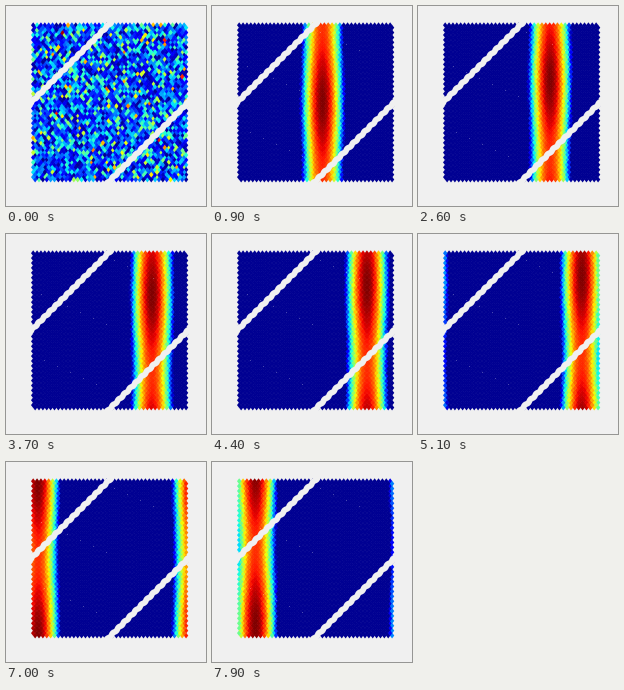
A matplotlib script that plays this animation: 200 by 200 pixels, repeating every 8000 ms.

```python
import numpy as np
import matplotlib.pyplot as plt
from matplotlib.animation import FuncAnimation
from matplotlib.collections import PolyCollection

SIZE, DPI = 200, 100
FRAMES, INTERVAL = 80, 100
PERIOD = 156.0            # both sides of the sheet wrap around
HALF_BAND = 22.4
SPEED = 12.7              # px per second, right and up
HOLD = 4                  # frames of plain noise at the start
PAPER = "#f0f0f0"

rng = np.random.default_rng(7)


def lattice(cols=40, rows=64, dx=3.87, dy=2.45):
    """Centres of staggered diamonds in a shuffled drawing order."""
    row, col = np.mgrid[0:rows, 0:cols]
    x = 27.2 + dx * (col + 0.5 * (row % 2))
    y = 19.2 + dy * row
    return rng.permutation(np.column_stack([x.ravel(), y.ravel()]))


def wrap(d):
    return (d + PERIOD / 2) % PERIOD - PERIOD / 2


centres = lattice()
x, y = centres.T
noise = np.clip(np.abs(rng.normal(0, 0.28, x.size)), 0, 1)


def bump(t):
    """Activity band drifting right while its peak drifts up."""
    shift = SPEED * (t - 1.8)
    dx = wrap(x - (122 + shift))
    dy = wrap(y - (85 - shift))
    dip = 0.07 * (1 - np.cos(2 * np.pi * dy / PERIOD))
    return np.clip(1 - (dx / HALF_BAND) ** 2 - dip, 0, 1)


def activity(n):
    if n < HOLD:
        return noise
    rest = 0.35 ** (n - HOLD + 1) if n < HOLD + 4 else 0
    return (1 - rest) * bump(n * INTERVAL / 1000) + rest * noise


fig = plt.figure(figsize=(SIZE / DPI, SIZE / DPI), dpi=DPI, facecolor=PAPER)
ax = fig.add_axes([0, 0, 1, 1])
ax.set_xlim(0, SIZE)
ax.set_ylim(SIZE, 0)
ax.axis("off")

diamond = np.array([(0, -2.9), (2.2, 0), (0, 2.9), (-2.2, 0)])
cells = PolyCollection(centres[:, None, :] + diamond, cmap="jet", linewidths=0)
cells.set_clim(-0.016, 1)
ax.add_collection(cells)

# slightly wavy diagonal gaps
for total, left, right in ((121.5, 18, 110), (278.5, 96, 190)):
    gx = np.linspace(left, right, 120)
    wave = 0.4 * np.sin(gx * 1.1)
    ax.plot(gx + wave, total - gx + wave, color=PAPER, lw=5.8 * 72 / DPI)

# faint pinholes between the cells
for x0, y0, count in ((108, 26, 4), (35, 60, 6), (38, 126, 5)):
    step = np.arange(count)
    ax.scatter(x0 + 13 * step, y0 + 6 * step, s=0.5, color="white",
               alpha=0.2, linewidths=0)


def draw(n):
    cells.set_array(activity(n))
    return (cells,)


anim = FuncAnimation(fig, draw, frames=FRAMES, interval=INTERVAL,
                     repeat=True, repeat_delay=0)
plt.show()
```
